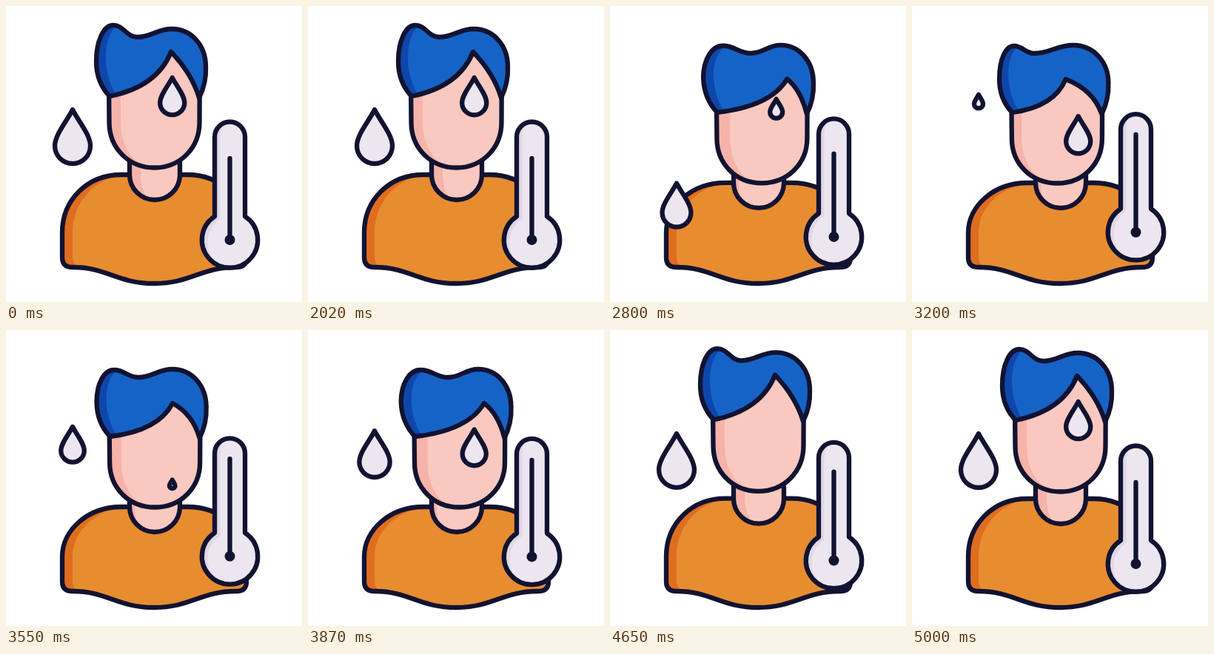
An HTML page with a canvas that plays this animation: 400 px wide and 400 px high, repeating every 5020 ms.

```html
<!DOCTYPE html>
<html lang="en">
<head>
<meta charset="utf-8">
<title>Fever</title>
<style>
  html, body { margin: 0; width: 100%; height: 100%; overflow: hidden; background: #fff; }
  canvas { display: block; width: 100vw; height: 100vh; }
</style>
</head>
<body>
<canvas id="stage"></canvas>
<script>
const LOOP = 5020, REST = 2020, MOVE = 2980;
const SIZE = 400;
const INK = '#121331';
const ORANGE = { light: '#e88c30', dark: '#df6d20' };
const SKIN = { light: '#f9c9c0', dark: '#f6b3a9' };
const BLUE = { light: '#1663c7', dark: '#0e47ab' };
const PALE = { light: '#ebe6ef', dark: '#e0d8e6' };

const canvas = document.getElementById('stage');
const ctx = canvas.getContext('2d');
const ratio = window.devicePixelRatio || 1;
canvas.width = canvas.height = SIZE * ratio;

const clamp = u => Math.min(1, Math.max(0, u));
const smooth = u => { u = clamp(u); return u * u * (3 - 2 * u); };
const easeOut = u => Math.sin(clamp(u) * Math.PI / 2);

// Motion rules; m is the time since the movement began.

// Rears up a little, then sinks; the way back mirrors it.
function nod(m) {
  const edge = Math.min(m, MOVE - m);
  return -.29 * smooth(edge / 280) + 1.29 * easeOut((edge - 280) / 540);
}

// Two full shakes of the head.
function sway(m) {
  const start = 477, half = 517;
  return Math.sin(Math.PI * 4 * clamp((m - start) / (4 * half)));
}

// Climbs from the given time, then sinks back ever faster.
function warmth(m, start) {
  const peak = 1180;
  return smooth((m - start) / (peak - start)) * (1 - clamp((m - peak) / (MOVE - peak)) ** 2.7);
}

// Falls away, then grows back in its first place.
function airDrop(m) {
  const gone = 1030;
  const fall = m / gone;
  if (fall < 1) return { x: 90, top: 140 + 173 * fall ** 2, scale: 1 - fall ** 6 };
  const scale = 1 - (1 - (m - gone) / (MOVE - gone)) ** 3.6;
  return { x: 90, top: 113 + 27 * scale, scale };
}

// Swells on the forehead, slides and drips off, three times over.
function sweatDrop(m, tilt) {
  const turns = (m - 680) / (MOVE / 3);
  const u = turns - Math.floor(turns);
  const drip = smooth((u - .65) / .3);
  const scale = smooth(u / .2) * (1 - drip);
  const top = 73 + 44 * tilt + 18 * smooth(u / .2) + 43 * Math.max(0, u - .18) + 50 * drip;
  return { x: 224.7, top, scale: .69 * scale };
}

// Fills an outline, shades it inside, then strokes the edge.
function part(outline, color, shadow) {
  const path = new Path2D(outline);
  ctx.fillStyle = color.light;
  ctx.fill(path);
  if (shadow) {
    ctx.save();
    ctx.clip(path);
    ctx.fillStyle = color.dark;
    ctx.fill(new Path2D(shadow));
    ctx.restore();
  }
  ctx.stroke(path);
}

// Curve between points that are each upright ('v') or level ('h') there.
function bend(a, b, dirs) {
  const k = dirs[0] === dirs[1] ? .43 : .57;
  const handle = (p, q, dir) => dir === 'v'
    ? [p[0], p[1] + k * (q[1] - p[1])]
    : [p[0] + k * (q[0] - p[0]), p[1]];
  return `C${handle(a, b, dirs[0])} ${handle(b, a, dirs[1])} ${b}`;
}

function drawBody(drop, tilt) {
  const y = 228 + drop;
  const arm = 262 + drop * .8;
  part(`M156 ${y}C110 ${y} 76 ${arm} 76 306V340Q76 353 90 353
    C137 353 150 375 200 375S263 353 311 353Q325 353 325 340V306
    C325 ${arm} 291 ${y} 245 ${y}Z`, ORANGE,
    `M60 200H168V${y}C124 ${y} 90 ${arm} 90 306V340Q91 353 104 354V380H60Z`);
  const edge = 182 - 8 * tilt;
  part(`M167 190V${y}A34 34 0 0 0 235 ${y}V190`, SKIN,
    `M160 180H${edge}V${y}Q${edge} ${y + 24} ${edge + 14} ${y + 36}H160Z`);
}

function drawHead(turn, tilt) {
  // Nearer points follow the turn further; dip is the travel of a nod.
  const at = (x, y, depth = .3, dip = 22) => [x + 17 * depth * turn, y + dip * tilt];

  const cheek = at(139.5, 157), jaw = at(261.5, 157);
  const chin = at(200.5, 218.5, .25, 21);
  part(`M${at(138.5, 55)}L${cheek}${bend(cheek, chin, 'vh')}${bend(chin, jaw, 'hv')}L${at(262, 55)}`,
    SKIN,
    `M${at(155, 55, .45)}L${at(155, 157, .45)}${bend(at(155, 157, .45), chin, 'vh')}V240H100V60Z`);

  const left = at(140, 122), right = at(261, 124), tip = at(223, 62, 1, 37);
  const back = at(122, 75, .25), front = at(270, 82);
  const lobe = at(145, 26, .47, 28), notch = at(177, 42, .8), hump = at(224, 31, .4);
  part(`M${left}Q${at(122, 103)} ${back}`
    + bend(back, lobe, 'vh') + bend(lobe, notch, 'hh')
    + bend(notch, hump, 'hh') + bend(hump, front, 'hv')
    + `Q${at(271, 104)} ${right}Q${at(251, 91, .4)} ${tip}Q${at(204.5, 109, .78, 27)} ${left}Z`,
    BLUE,
    `M${at(154, 24, .4, 28)}C${at(130, 36, .3, 26)} ${at(128, 92)} ${at(152, 125)}H90V10Z`);
}

function drawThermometer(rise, level) {
  ctx.save();
  ctx.translate(302.5, 316 - rise);
  part('M-20.5 -31.6V-139A20.5 20.5 0 0 1 20.5 -139V-31.6A37.7 37.7 0 1 1 -20.5 -31.6Z', PALE,
    'M-45 -165H0Q-13 -157 -13 -139V-28C-36 -14 -36 22 -12 38H-45Z');
  ctx.stroke(new Path2D(`M0 0V${-level}`));
  ctx.fillStyle = INK;
  ctx.beginPath();
  ctx.arc(0, 0, 7, 0, 2 * Math.PI);
  ctx.fill();
  ctx.restore();
}

function drawDrop({ x, top, scale }) {
  if (scale < .02) return;
  const p = (a, b) => `${a * scale} ${b * scale} `;
  ctx.save();
  ctx.translate(x, top);
  part('M0 0C' + p(8, 16) + p(24, 34) + p(24, 49) +
    'A' + p(24, 24) + '0 0 1 ' + p(-24, 49) +
    'C' + p(-24, 34) + p(-8, 16) + '0 0Z', PALE);
  ctx.restore();
}

function draw() {
  const m = MOVE * clamp((performance.now() % LOOP - REST) / MOVE);
  const tilt = nod(m);
  ctx.setTransform(ratio, 0, 0, ratio, 0, 0);
  ctx.fillStyle = '#fff';
  ctx.fillRect(0, 0, SIZE, SIZE);
  ctx.strokeStyle = INK;
  ctx.lineWidth = 6.3;
  ctx.lineCap = ctx.lineJoin = 'round';
  drawBody(11 * tilt, tilt);
  drawHead(sway(m), tilt);
  drawThermometer(10.3 * warmth(m, 480), 110 + 22 * warmth(m, 680));
  drawDrop(airDrop(m));
  drawDrop(sweatDrop(m, tilt));
  requestAnimationFrame(draw);
}
draw();
</script>
</body>
</html>
```
